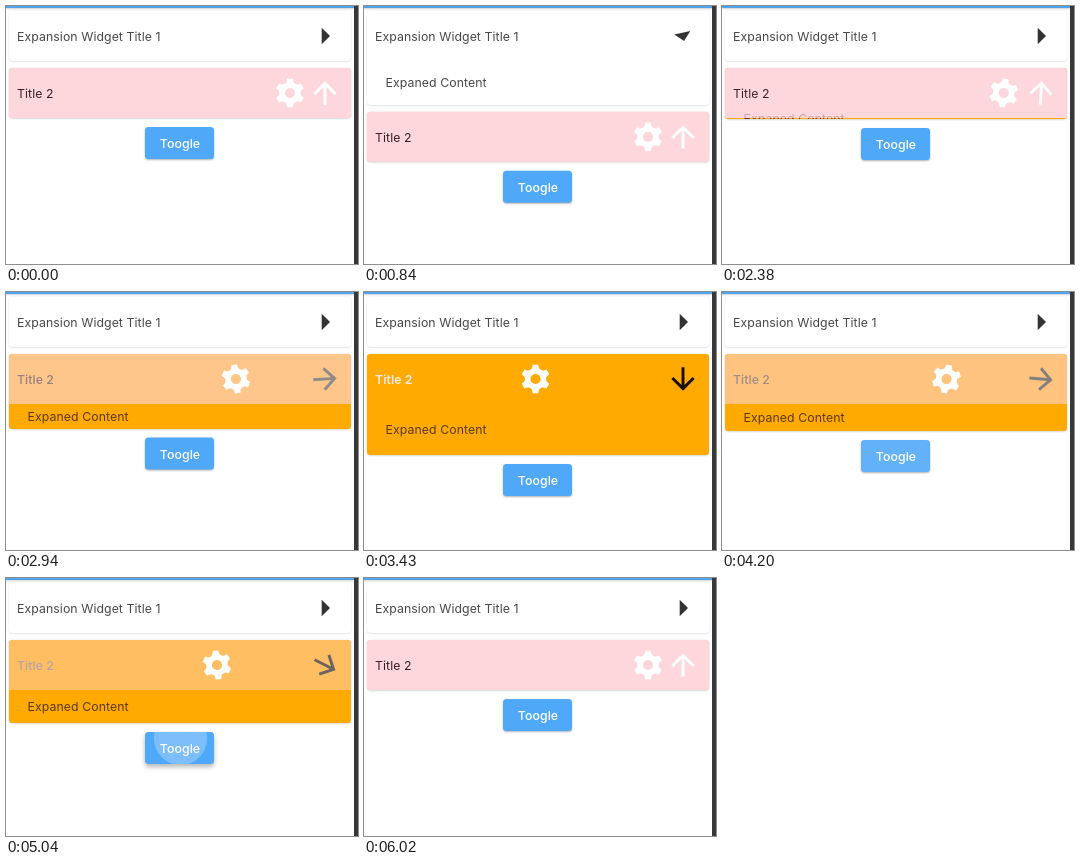
An HTML page that plays this animation: 352x258 px, repeating every 6.16 s.

```html
<!DOCTYPE html>
<html lang="en">
<head>
<meta charset="utf-8">
<title>Expansion widgets</title>
<style>
html, body { margin: 0; width: 100%; height: 100%; overflow: hidden; background: #fff; }
#stage {
  position: relative; width: 352px; height: 258px; overflow: hidden; background: #fff;
  font: 12.3px/16px Inter, "Open Sans", sans-serif; letter-spacing: .07px;
  color: #494949; white-space: nowrap;
}
#stage div, #stage svg { position: absolute; }
.bar { left: 0; top: 0; width: 348px; height: 2px; background: #4ea5ed; box-shadow: 0 1px 2px rgba(0, 0, 0, .2); }
.edge { right: 0; top: 0; width: 4px; height: 258px; background: #38383b; }
.card {
  left: 3px; width: 341.5px; height: 50px; border-radius: 3.5px; overflow: hidden;
  box-shadow: 0 .5px 2px rgba(0, 0, 0, .24);
}
#card1 { top: 5px; background: #fff; box-shadow: 0 .5px 1.5px rgba(40, 60, 80, .22); }
#card2 { top: 62px; background: #ffaa00; }
.head { left: 0; top: 0; width: 100%; height: 50px; overflow: hidden; }
.title { left: 8px; top: 17.5px; }
.body { left: 0; top: 50px; width: 100%; overflow: hidden; }
.body div, #ghost { left: 18.5px; }
#card2 .body, #ghost { color: #5f3a20; }
#ghost { top: 42px; opacity: .3; }
svg { overflow: visible; width: 1px; height: 1px; }
#button {
  left: 139px; top: 121px; width: 69px; height: 32px; border-radius: 3.5px;
  background: #50a8f8; color: #fff; font-weight: 550; line-height: 32px; text-align: center;
}
#clip { inset: 0; border-radius: 3.5px; overflow: hidden; }
#ripple { left: 35.5px; top: 6.5px; border-radius: 50%; background: #fff; }
#button .label { left: .5px; top: .5px; width: 69px; }
</style>
</head>
<body>
<div id="stage">
  <div class="bar"></div>
  <div class="card" id="card1">
    <div class="head">
      <div class="title">Expansion Widget Title 1</div>
      <svg style="left:316px;top:25px"><path id="caret" d="M-3.3-8.2 5 0-3.3 8.2z" fill="#333"/></svg>
    </div>
    <div class="body"><div>Expaned Content</div></div>
  </div>
  <div class="card" id="card2">
    <div class="body"><div>Expaned Content</div></div>
    <div class="head" id="head2">
      <div id="ghost">Expaned Content</div>
      <div class="title" id="title2">Title 2</div>
      <svg style="left:280.7px;top:25px"><g id="gear" fill="#fff">
        <circle r="5.4" fill="none" stroke="#fff" stroke-width="3.8"/>
      </g></svg>
      <svg style="left:316.2px;top:25.2px">
        <path id="arrow" d="M-8 0l1.41 1.41L-1-4.17V8h2V-4.17l5.58 5.59L8 0 0-8z"/>
      </svg>
    </div>
  </div>
  <div id="button">
    <div id="clip"><div id="ripple"></div></div>
    <div class="label">Toogle</div>
  </div>
  <div class="edge"></div>
</div>
<script>
const LOOP = 6160, BODY = 51, ICON = 1.46;
const $ = s => document.querySelector(s);
const clamp = x => Math.min(1, Math.max(0, x));
const mix = (a, b, k) => `rgb(${a.map((c, i) => Math.round(c + (b[i] - c) * k))})`;

// [time, progress], linear in between
const FIRST = [[420, 0], [910, 1], [1190, 1], [1680, 0]];
const SECOND = [[2267, 0], [3317, 1], [3865, 1], [4574, .325], [5075, .802], [5917, 0]];
const PRESSES = [[3715, 3865], [4430, 4574], [4935, 5075]];

function progress(steps, t) {
  let [t0, v0] = steps[0];
  for (const [t1, v1] of steps) {
    if (t < t1) return v0 + (v1 - v0) * clamp((t - t0) / (t1 - t0));
    [t0, v0] = [t1, v1];
  }
  return v0;
}

// cubic-bezier(.42, 0, 1, 1)
function easeIn(x) {
  let lo = 0, hi = 1;
  for (let i = 0; i < 24; i++) {
    const u = (lo + hi) / 2, w = 1 - u;
    if (1.26 * w * w * u + 3 * w * u * u + u ** 3 < x) lo = u; else hi = u;
  }
  return 3 * lo * lo - 2 * lo ** 3;
}

const SVG = "http://www.w3.org/2000/svg";
for (let i = 0; i < 6; i++) {
  const tooth = document.createElementNS(SVG, "path");
  tooth.setAttribute("d", "M-3.3-6.2-2.4-7.3-1.9-9.8H1.9L2.4-7.3 3.3-6.2z");
  tooth.setAttribute("transform", `rotate(${i * 60})`);
  $("#gear").append(tooth);
}

function openCard(card, size) {
  $(card).style.height = 50 + size + "px";
  $(card + " .body").style.height = size + "px";
  $(card + " .body div").style.top = size / 2 - 7.5 + "px";
}

function drawButton(t, shift) {
  const press = PRESSES.filter(p => p[0] <= t).pop();
  let radius = 0, alpha = 0, lift = 0;
  if (press) {
    const [down, up] = press;
    radius = 10 + 36 * clamp((t - down) / 225);
    alpha = .25 * clamp((t - down) / 75) * (1 - clamp((t - up) / 590));
    lift = clamp((t - down) / 120) * (1 - clamp((t - up) / 200));
  }
  Object.assign($("#ripple").style, {
    width: 2 * radius + "px", height: 2 * radius + "px",
    margin: `${-radius}px 0 0 ${-radius}px`, opacity: alpha
  });
  $("#button").style.transform = `translateY(${shift}px)`;
  $("#button").style.boxShadow = `0 ${1 + 2 * lift}px ${2 + 4 * lift}px rgba(0,0,0,.3)`;
}

function render(t) {
  const a = progress(FIRST, t), b = easeIn(progress(SECOND, t));
  openCard("#card1", BODY * a);
  $("#caret").setAttribute("transform", `rotate(${90 * a})`);

  openCard("#card2", BODY * b);
  $("#card2").style.transform = `translateY(${BODY * a}px)`;
  $("#card2").style.backgroundColor = b > .001 ? "#ffaa00" : "#fdd7dc";
  $("#head2").style.background = mix([253, 215, 220], [255, 170, 0], b ** 1.35);
  $("#title2").style.color = mix([56, 34, 38], [252, 234, 230], b);
  $("#title2").style.fontWeight = 400 + 200 * b;
  $("#ghost").style.display = b > .001 ? "" : "none";
  $("#ghost").style.transform = `translateY(${BODY * b / 2}px)`;
  $("#gear").setAttribute("transform", `translate(${-112.5 * b}) rotate(${360 * b}) scale(${ICON})`);
  $("#arrow").setAttribute("transform", `rotate(${180 * b}) scale(${ICON})`);
  $("#arrow").setAttribute("fill", mix([255, 255, 255], [25, 15, 10], b));

  drawButton(t, BODY * (a + b));
}

const start = performance.now();
function tick() {
  render((performance.now() - start) % LOOP);
  requestAnimationFrame(tick);
}
tick();
</script>
</body>
</html>
```
